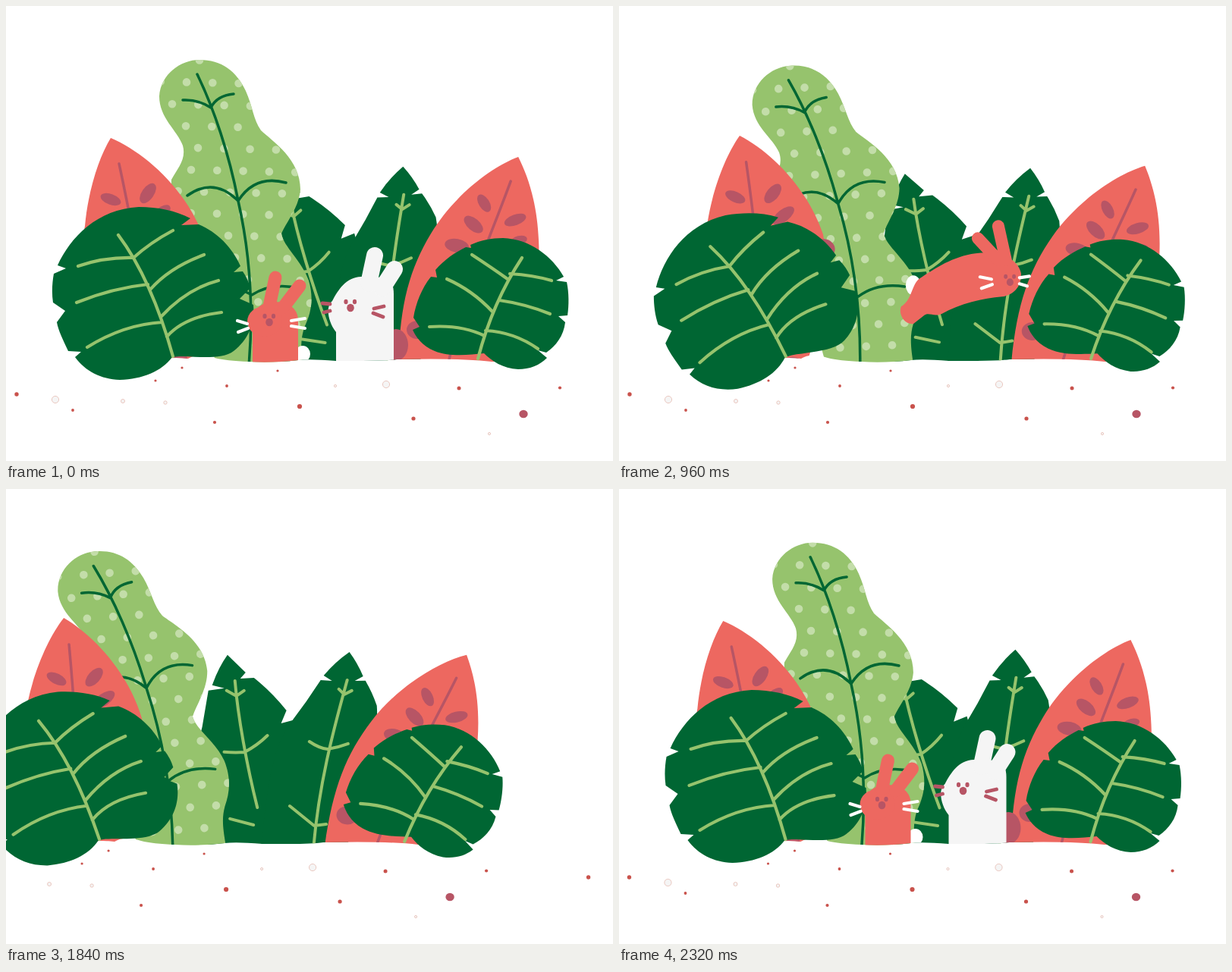
These frames come from a looping animation (800 by 600 pixels, 2.36 s). An HTML page:

```html
<!DOCTYPE html>
<html lang="en">
<head>
<meta charset="utf-8">
<title>Rabbits in the leaves</title>
<style>
html, body { margin: 0; width: 100%; height: 100%; overflow: hidden; background: #fff; }
svg { display: block; width: 800px; height: 600px; }
</style>
</head>
<body>
<svg id="stage" viewBox="0 0 800 600"></svg>
<script>
const LOOP = 2360, GAP = 850.5;
const PINK = '#ed6860', PLUM = '#b75565', DARK = '#006633', LEAF = '#96c36d', DOT = '#c3dda9', PALE = '#f5f5f5';

const shape = (d, fill) => `<path d="${d}" fill="${fill}"/>`;
const line = (d, col, w) =>
  `<path d="${d}" fill="none" stroke="${col}" stroke-width="${w}" stroke-linecap="round" stroke-linejoin="round"/>`;
const oval = (x, y, rx, ry, fill, rot = 0) =>
  `<ellipse cx="${x}" cy="${y}" rx="${rx}" ry="${ry}" fill="${fill}" transform="rotate(${rot} ${x} ${y})"/>`;
const clamp = u => Math.max(0, Math.min(1, u));
const smooth = u => { u = clamp(u); return u * u * (3 - 2 * u); };
const easeInOut = u => u < 0.5 ? 4 * u ** 3 : 1 - 4 * (1 - u) ** 3;

const GROUND = 'M-300-100H1100V468L640 469Q600 464 515 466Q500 468 470 468L435 468Q400 465 385 467Q350 471 320 469' +
  'Q290 468 275 464Q252 457 240 465Q225 463 205 465H-300Z';

const TALL = 'M255 71C284 71 304 86 316 112C325 132 326 150 336 164C352 179 388 202 388 242C386 266 370 284 363 300' +
  'C366 318 390 336 399 362C406 386 402 405 394 422C388 438 388 452 392 490L280 490C270 440 262 400 250 350' +
  'C240 300 216 260 218 229C226 214 238 202 233 184C226 164 202 148 202 119C204 90 230 71 255 71Z';

function tallDots() {
  const starts = [255, 238, 219, 237, 253, 244, 261, 278, 293, 302, 319, 298, 314, 330];
  return starts.map((x, i) => [-2, -1, 0, 1, 2, 3, 4].map(j =>
    oval(x + 34.3 * j, 71.5 + 28.9 * i + 0.8 * j, 5.3, 5.3, DOT)).join('')).join('');
}

// Each plant: lean in degrees over a full sway, delay in ms, root, sway position it is drawn at, picture
const plants = {
  backLeft: { lean: 6.1, delay: 200, root: [430, 465], at: 0.97, art: () =>
    shape('M388 219L412 242L405 250L423 249Q447 268 466 292L459 309L477 304C485 350 485 420 470 490L370 490' +
      'C345 430 345 350 355 314L363 266L384 263L368 259Q376 236 388 219Z', DARK) +
    line('M398 253C402 300 414 365 428 420M387 266L400 273L410 266M384 347Q400 348 411 347Q428 338 441 325M392 435L423 443', LEAF, 4) },
  backRight: { lean: 6, delay: 0, root: [505, 468], at: 1, art: () =>
    shape('M550 215Q561 230 568 247L557 253L571 253Q580 268 586 286C590 340 560 430 540 490L430 490' +
      'C440 430 440 350 474 306Q494 280 512 252L527 253L516 246Q531 228 550 215Z', DARK) +
    line('M547 252C534 300 510 380 502 475M536 264L543 271L553 266M497 333Q510 342 521 343Q535 341 548 336M471 418L503 444L519 442', LEAF, 4) },
  tall: { lean: -5.6, delay: 0, root: [352, 510], at: 0, art: id =>
    `<clipPath id="tall${id}"><path d="${TALL}"/></clipPath>` + shape(TALL, LEAF) +
    `<g clip-path="url(#tall${id})">${tallDots()}</g>` +
    line('M252 90C274 135 294 195 306 257C318 310 328 380 320 475M233 124Q253 123 270 134Q278 118 300 116' +
      'M239 250Q274 225 306 257Q328 222 369 233M302 370L324 381Q350 364 386 372', DARK, 3.5) },
  pinkLeft: { lean: 6.5, delay: 150, root: [190, 466], at: -0.05, art: () =>
    shape('M138 174C180 192 232 236 257 296C270 345 262 430 240 490L170 490C120 430 95 330 104 290C108 245 122 200 138 174Z', PINK) +
    line('M149 208C160 260 180 350 190 475', PLUM, 3.5) +
    oval(138, 255, 14, 7, PLUM, 20) + oval(187, 247, 15, 8, PLUM, -55) + oval(203, 275, 17, 8, PLUM, -42) +
    oval(259, 315, 15, 13, PLUM) + oval(230, 464, 9, 4, PLUM) },
  pinkRight: { lean: 6.1, delay: 130, root: [514, 468], at: -0.05, art: () =>
    shape('M675 199C640 212 590 250 560 300C530 350 517 400 517 490L645 490C690 430 705 370 702 310C700 260 688 225 675 199Z', PINK) +
    line('M665 231C640 300 600 390 582 475', PLUM, 3.5) +
    oval(630, 260, 13, 7, PLUM, 58) + oval(616, 288, 15, 8, PLUM, 40) + oval(594, 316, 16, 9, PLUM, 10) +
    oval(671, 282, 15, 7, PLUM, -20) + oval(676, 309, 11, 6, PLUM, -15) + oval(542, 427, 14, 12, PLUM) },
  frontLeft: { lean: -2.9, delay: 0, root: [219, 463], at: 0, art: () =>
    shape('M175 265C200 265 224 270 243 280L231 289L254 288C278 298 298 318 309 343L300 351L312 350Q319 360 322 372' +
      'L308 386L326 394C328 415 322 438 300 455C285 467 250 462 228 462L219 463C205 482 180 492 150 493' +
      'C125 492 105 482 91 463L99 456L82 455C75 440 69 428 67 417L78 402L62 391C60 378 61 364 63 353L79 346L68 342' +
      'C85 305 120 268 175 265Z', DARK) +
    line('M148 302C175 338 200 390 220 462M95 343Q130 331 168 332Q190 312 220 296M93 391Q140 372 187 367' +
      'M190 374Q215 345 261 328M107 450Q155 420 206 417M204 410Q238 373 280 362M212 436Q235 410 284 404', LEAF, 4.2) },
  frontRight: { lean: 7.4, delay: 400, root: [624, 466], at: -0.07, art: () =>
    shape('M655 306C690 307 720 330 735 357L725 362L739 364C742 378 742 395 740 408L728 409L737 417C735 435 725 448 712 457' +
      'L701 454L713 464C703 474 690 479 675 479C655 478 640 468 630 458C610 460 585 463 565 455C548 448 540 436 536 427' +
      'L545 423L537 411C540 392 548 372 560 357L568 358L566 348C578 334 592 325 606 318L613 319L612 315C625 309 640 306 655 306Z', DARK) +
    line('M680 332C655 370 635 415 622 465M664 353Q695 355 719 362M650 388Q685 393 717 406M632 428Q670 430 701 452' +
      'M614 328Q640 345 661 360M581 360Q615 375 641 403M558 423Q600 420 631 435', LEAF, 4.2) }
};

const face = (x, y, s) => oval(x - 6 * s, y - 8 * s, 2.6 * s, 3.2 * s, PLUM) +
  oval(x + 5.5 * s, y - 8 * s, 2.6 * s, 3.2 * s, PLUM) + oval(x, y, 4.8 * s, 5.3 * s, PLUM);

// p runs from -1 (looking left) to 1 (looking right)
function redSitting(p) {
  const c = 355, hair = (a, y1, b, y2) => line(`M${c + a * p} ${y1}L${c + b * p} ${y2}`, '#fff', 4.2);
  return oval(c - 36 * p, 459, 10, 11, '#fff') +
    shape('M325 510V412Q328 391 355 390Q382 391 385 412V510Z', PINK) +
    oval(c + 14 * p, 416, 23, 20, PINK) +
    line(`M${352 + 5 * p} 396L${353 - 2 * p} 358M${c - 10 * p} 398L${c - 32 * p} 369`, PINK, 17) +
    face(c + 8 * p, 417, 1) +
    hair(37, 419, 50, 415) + hair(36, 425, 49, 430) + hair(-21, 415, -39, 412) + hair(-21, 422, -39, 425);
}

function whiteSitting(q) {
  const ex = -7 * q, ey = 5 * q;
  return oval(514, 447, 16, 21, PLUM) + `<g transform="translate(0 ${19 * q})">` +
    shape('M435 510V430C424 416 421 396 430 389C438 374 448 358 468 357L500 358Q511 362 511 380V510Z', PALE) +
    line(`M478 366L${486 + ex} ${329 + ey}M496 372L${512 + ex} ${347 + ey}`, PALE, 22) +
    face(454, 398, 1) +
    line('M417 392L427 393M419 404L427 402M485 399L498 396M484 405L497 410', PLUM, 4.8) + '</g>';
}

function leaping(fur, marks) {
  return oval(388, 368, 10, 13, marks) +
    shape('M395 360C418 345 440 330 470 326C500 321 526 333 530 352C531 370 520 381 505 383C480 385 450 392 425 406' +
      'C415 410 408 403 402 408L388 419C376 420 368 406 372 396C386 388 385 370 395 360Z', fur) +
    line('M510 335L500 290M500 335L473 306', fur, 16) + face(515.5, 364, 0.95) +
    line('M476 357L491 360M478 372L492 367M528 358L541 356M528 366L538 369', marks, 4.2);
}

// Flight along an arc; side is -1 for a leap to the left
function flight(u, from, to, base, drop, height, size, side) {
  const x = from + (to - from) * u, y = base + drop * u - height * 4 * u * (1 - u);
  return `<g transform="translate(${x} ${y}) scale(${size * side} ${size}) rotate(${(u - 0.35) * 70}) translate(-455 -370)">`;
}

function red(t) {
  if (t < 850) {
    const dip = 18 * smooth((t - 760) / 85);
    return `<g transform="translate(0 ${dip})">${redSitting(2 * smooth((t - 360) / 180) - 1)}</g>`;
  }
  const u = (t - 850) / 314;
  return u < 1 ? flight(u, 355, 640, 430, 40, 81, 1, 1) + leaping(PINK, '#fff') + '</g>' : '';
}

function white(t) {
  if (t < 680) return whiteSitting(smooth((t - 510) / 130));
  const u = (t - 680) / 220;
  return u < 1 ? flight(u, 470, 185, 425, 20, 95, 1.2, -1) + leaping(PALE, PLUM) + '</g>' : '';
}

function specks() {
  const bright = [[14, 512, 2.7], [88, 533, 1.9], [197, 494, 1.6], [232, 477, 1.6], [275, 549, 2.1], [291, 501, 1.9],
    [358, 481, 1.6], [387, 528, 3.1], [537, 544, 2.6], [597, 504, 2.5], [730, 503.5, 2.1]];
  const faint = [[65, 519, 4.6], [154, 521, 2.5], [210, 523, 2.2], [434, 501, 1.6], [501, 499, 4.6], [637, 564, 1.6]];
  return bright.map(([x, y, r]) => oval(x, y, r, r, '#c9524c')).join('') + oval(682, 538, 5.7, 5.3, PLUM) +
    faint.map(([x, y, r]) => `<circle cx="${x}" cy="${y}" r="${r}" fill="${PALE}" stroke="#e6bcb2" stroke-width=".8"/>`).join('');
}

// A leaf knocked by a landing rabbit swings and settles
function shudder(t, size) {
  return t < 0 ? 0 : size * Math.exp(-t / 220) * Math.sin(2 * Math.PI * t / 400);
}

// Wind: 0 at the start of a visit, about 1 when the scene leaves
const sway = t => (0.869 - Math.cos(Math.PI * (t + 330) / 2000)) / 1.868;

function makeScene(id) {
  const g = document.createElementNS('http://www.w3.org/2000/svg', 'g');
  const plant = n => `<g class="${n}">${plants[n].art(id)}</g>`;
  const clip = s => `<g clip-path="url(#ground${id})">${s}</g>`;
  g.innerHTML = `<clipPath id="ground${id}"><path d="${GROUND}"/></clipPath>` +
    clip(['backLeft', 'backRight', 'tall', 'pinkLeft', 'pinkRight'].map(plant).join('') + '<g class="white"></g>') +
    plant('frontLeft') + clip('<g class="red"></g>') + plant('frontRight') + specks();
  document.getElementById('stage').appendChild(g);
  const find = n => g.querySelector('.' + n);
  const parts = Object.keys(plants).map(n => [n, find(n)]);
  const redBox = find('red'), whiteBox = find('white');

  return (t, x) => {
    g.setAttribute('transform', `translate(${x} 0)`);
    g.style.display = x > 799 || x < -799 ? 'none' : '';
    const shake = { frontLeft: -shudder(t - 860, 13), frontRight: shudder(t - 1080, 14) };
    for (const [n, el] of parts) {
      const { lean, delay, root, at } = plants[n];
      const angle = lean * (sway(t - delay) - at) + (shake[n] || 0);
      el.setAttribute('transform', `rotate(${angle} ${root})`);
    }
    redBox.innerHTML = red(t);
    whiteBox.innerHTML = white(t);
  };
}

const current = makeScene('A'), next = makeScene('B');

function draw(t) {
  const slide = 851 * easeInOut(clamp((t - 1640) / 655));
  current(t, -slide);
  next(t - LOOP, GAP - slide);
}

let begin;
function tick(now) {
  if (begin === undefined) begin = now;
  draw((now - begin) % LOOP);
  requestAnimationFrame(tick);
}
draw(0);
requestAnimationFrame(tick);
</script>
</body>
</html>
```
